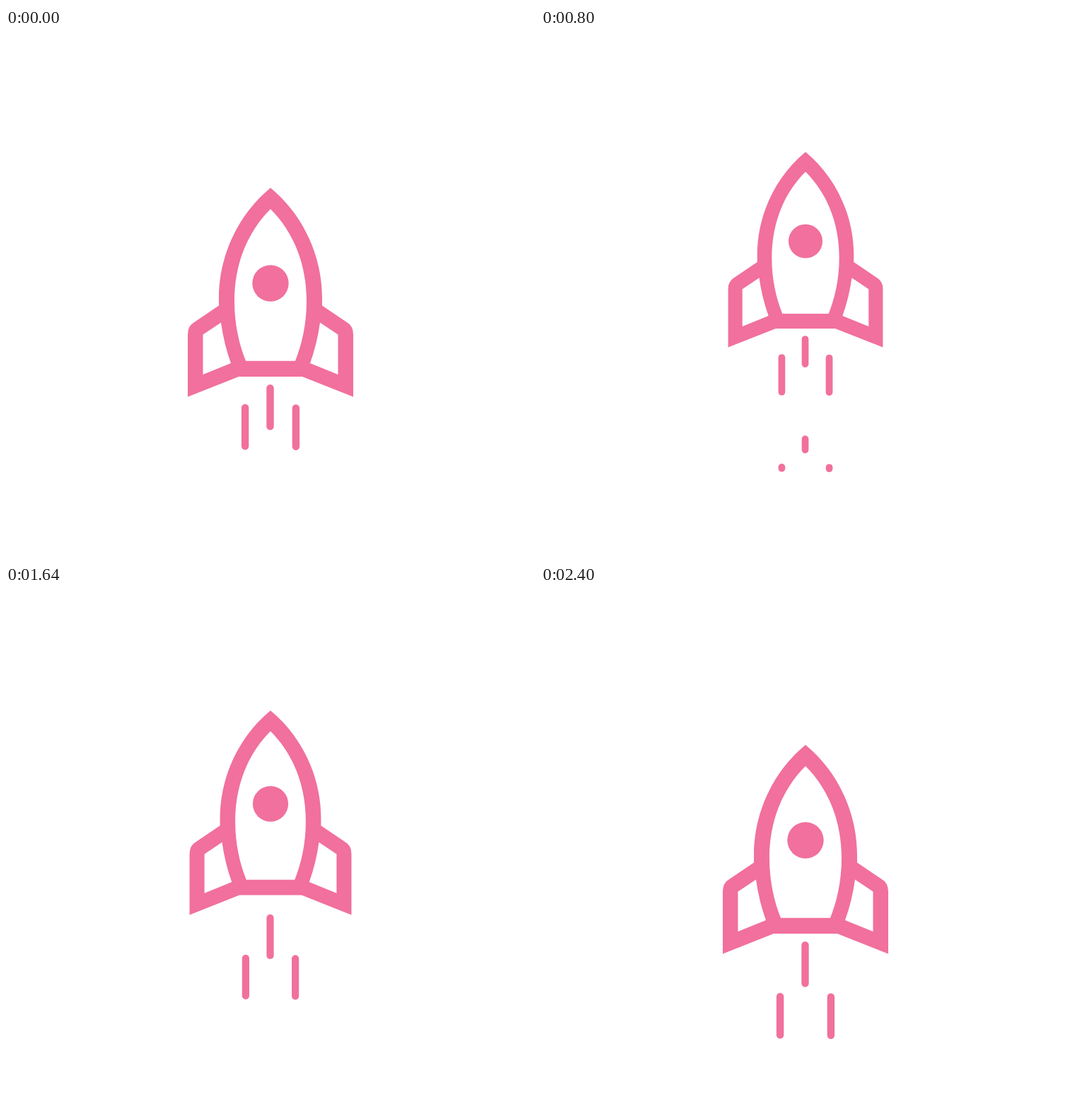
Recreate the animation shown at these times as an HTML page. Size 748 by 748 pixels, loop 2460 ms.

```html
<!DOCTYPE html>
<html lang="en">
<head>
<meta charset="utf-8">
<title>Rocket</title>
<style>
  html, body { margin: 0; width: 100%; height: 100%; overflow: hidden; background: #fff; }
  svg { display: block; width: 100vw; height: 100vh; }
  .trail { fill: none; stroke: #f1709d; stroke-width: 10.4; stroke-linecap: round; stroke-dasharray: 54.2 113.5; }
</style>
</head>
<body>
<svg viewBox="0 0 748 748">
  <g id="rocket">
    <path fill="#f1709d" fill-rule="evenodd" d="
      M374 226 C328 264 301 322 301 382 V392.5 L267 415.5 Q257 421 257 433 V521.5 L329 493
      H419 L491 521.5 V433 Q491 421 481 415.5 L447 392.5 V382 C447 322 420 264 374 226 Z
      M374 256 C340 290 323 336 323 386 C323 420 330 448 339 470.7
      H409 C418 448 425 420 425 386 C425 336 408 290 374 256 Z
      M304 416.5 L278.5 433.5 V490 L318 474 Q308 446 304 416.5 Z
      M444 416.5 L469.5 433.5 V490 L430 474 Q440 446 444 416.5 Z"/>
    <circle cx="374" cy="361" r="25.7" fill="#f1709d"/>
    <path class="trail" d="M373.5 509.2 v167.4"/>
    <path class="trail side" d="M338.1 537 v167.6"/>
    <path class="trail side" d="M409.9 537.5 v167.6"/>
  </g>
</svg>
<script>
  const LOOP = 2460, STEP = 20, SPAN = 2400;
  const TOP = 1200, LANDED = 2100, SWELL = 2045;
  const PIVOT = 445;
  const PERIOD = 167.7;
  const MID_SPEED = 12 * PERIOD / SPAN;
  const SIDE_SPEED = (12 * PERIOD + 45) / SPAN;

  const rocket = document.getElementById('rocket');
  const trails = [...document.querySelectorAll('.trail')];

  const part = (t, from, to) => Math.min(1, Math.max(0, (t - from) / (to - from)));
  const easeOut = p => p + 0.17 * p * (1 - p);

  // Climbs at a steady speed, then sinks back.
  const lift = t => 100 * (part(t, 0, TOP) - part(t, TOP, LANDED));

  // Shrinks while climbing, swells on the way down, then settles.
  const size = t => 1 - 0.1 * part(t, 0, TOP)
    + 0.145 * easeOut(part(t, TOP, SWELL))
    - 0.045 * part(t, SWELL, SPAN);

  // The first and last poses are held a little longer than one step.
  function clock(ms) {
    const t = Math.floor((ms % LOOP) / STEP) * STEP;
    return t >= SPAN ? SPAN : Math.max(0, t - STEP);
  }

  function draw(ms) {
    const t = clock(ms);
    rocket.setAttribute('transform',
      `translate(374 ${PIVOT - lift(t)}) scale(${size(t)}) translate(-374 ${-PIVOT})`);
    for (const trail of trails) {
      const speed = trail.classList.contains('side') ? SIDE_SPEED : MID_SPEED;
      trail.style.strokeDashoffset = -(speed * t % PERIOD);
    }
  }

  const start = performance.now();
  function tick() {
    draw(performance.now() - start);
    requestAnimationFrame(tick);
  }
  tick();
</script>
</body>
</html>
```
